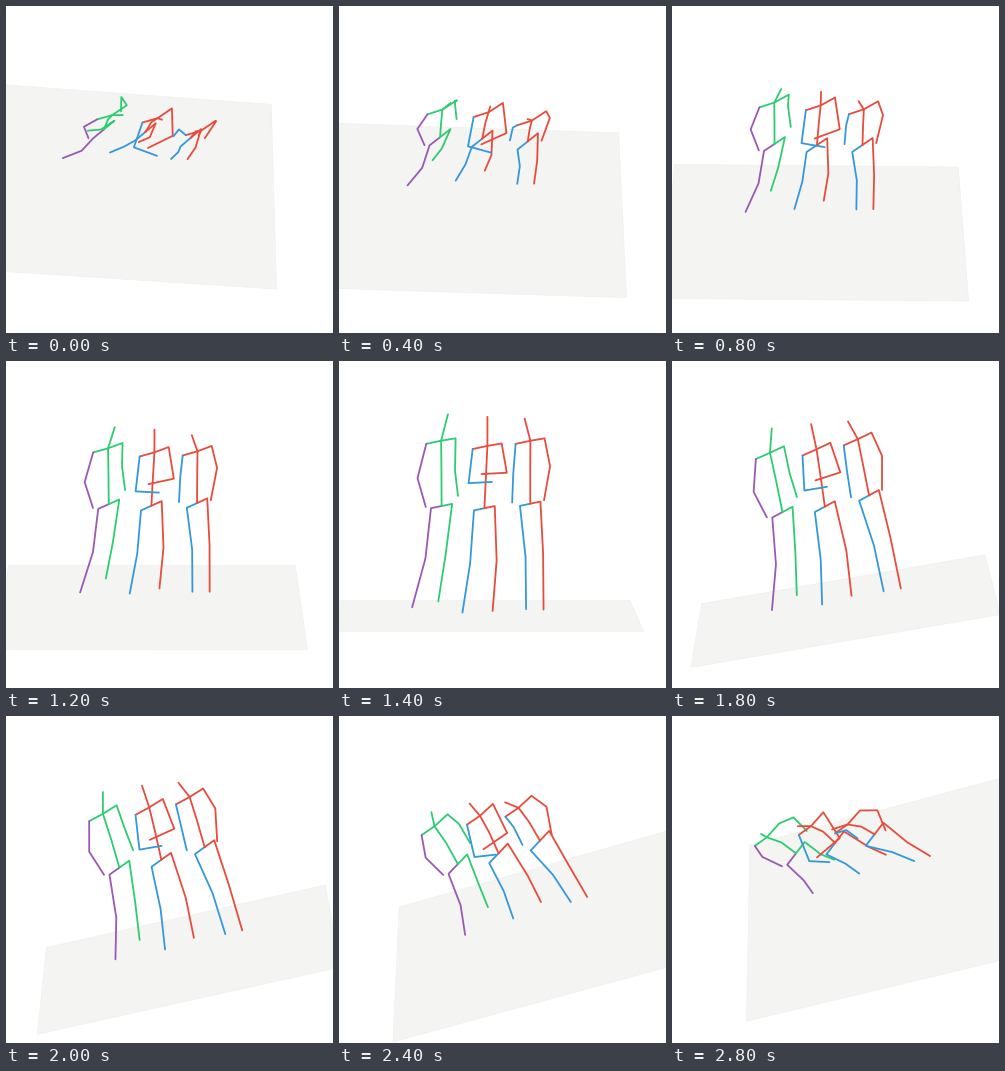
A matplotlib script for the animation above (3 s loop, 327 px wide and 327 px high).

```python
import numpy as np
import matplotlib.pyplot as plt
from matplotlib.animation import FuncAnimation

SIZE, DPI = 327, 100
FRAMES, STEP = 15, 200
TURN = 7                   # frame where the camera is lowest
CENTRE = np.array([146, 105])
DISTANCE = 2450

GREEN, PURPLE, RED, BLUE = "#2ecc71", "#9b59b6", "#e74c3c", "#3498db"

# World axes: across, up, towards the viewer. Each body is a pelvis position
# and bone vectors; hips, shoulders and the spine bend follow shared rules.
HIP = np.array([10.4, 1.2, -10.3])
SHOULDER = np.array([14.4, 2.2, -8])
COLLAR_DROP = np.array([-0.2, -0.6, -3.5])
SPINE_BEND = np.array([0, 0, -3.5])

BODIES = [
    dict(colours=(GREEN, PURPLE), pelvis=(-43.4, -40, 2),
         torso=(0, 67, 22), head=(7, 27, 15),
         side_arm=[(-9, -35, -11), (8, -29, -4)],
         main_arm=[(-1, -35, -30), (3, -25, 2)],
         side_leg=[(-6, -52, -14), (-14, -52, -19)],
         main_leg=[(-7, -54, -20), (-8, -51, -27)]),
    dict(colours=(RED, BLUE), pelvis=(-0.6, -42.4, 0),
         torso=(3, 64, 20.6), head=(0, 30, 19),
         side_arm=[(-4, -33, 10), (23, 2, 9)],
         main_arm=[(5, -28, 15), (-25, 0, 16)],
         side_leg=[(-4, -56, -24), (-8, -53, -22)],
         main_leg=[(2, -57, -16), (-4, -55, -25)]),
    dict(colours=(RED, BLUE), pelvis=(45.2, -37.3, 6),
         torso=(-0.5, 65, 29), head=(-6, 23, 18.5),
         side_arm=[(-2, -31, -24), (-1, -30, -9)],
         main_arm=[(6, -29, -17), (-6, -34, 1)],
         side_leg=[(6, -54, -24), (1, -56, -23)],
         main_leg=[(3, -54, -9), (1, -59, -19)]),
]

FLOOR = np.array([(152 * a, -150, 3 + 111 * d)
                  for a, d in [(-1, -1), (1, -1), (1, 1), (-1, 1)]])


def limb(start, bones):
    return np.cumsum([start, *bones], axis=0)


def build(body):
    """Return (points, colour) for each coloured path of one body."""
    main, side = body["colours"]
    pelvis = np.array(body["pelvis"])
    neck = pelvis + body["torso"]
    spine = (pelvis + neck) / 2 + SPINE_BEND
    collar = neck + COLLAR_DROP
    side_arm = limb(collar - SHOULDER, body["side_arm"])
    main_arm = limb(collar + SHOULDER, body["main_arm"])
    side_leg = limb(pelvis - HIP, body["side_leg"])
    main_leg = limb(pelvis + HIP, body["main_leg"])
    return [
        (np.vstack([pelvis, side_leg]), side),
        (np.vstack([pelvis, main_leg]), main),
        (np.vstack([neck + body["head"], neck, spine, pelvis]), main),
        (np.vstack([side_arm[0], neck, main_arm]), main),
        (side_arm, side),
    ]


def camera(t):
    """Pitch and roll in radians: sink to the floor, then rise and lean."""
    u = abs(t - TURN) / TURN
    if t < TURN:
        pitch, roll = 4.5 + 55.1 * u ** 0.67, -8.2 * u ** 3
    else:
        pitch, roll = 4.5 + 50.5 * u ** 1.43, 25 * u ** 0.72
    return np.radians(pitch), np.radians(roll)


def project(points, t):
    pitch, roll = camera(t)
    across, up, near = points.T
    x = across * np.cos(roll) - up * np.sin(roll)
    lift = across * np.sin(roll) + up * np.cos(roll)
    y = near * np.sin(pitch) - lift * np.cos(pitch)
    depth = lift * np.sin(pitch) + near * np.cos(pitch)
    scale = DISTANCE / (DISTANCE - depth)
    return CENTRE + np.column_stack([x * scale, y * scale])


fig = plt.figure(figsize=(SIZE / DPI, SIZE / DPI), dpi=DPI, facecolor="white")
ax = fig.add_axes([0, 0, 1, 1])
ax.set_xlim(0, SIZE)
ax.set_ylim(SIZE, 0)
ax.axis("off")

floor = plt.Polygon(project(FLOOR, 0), closed=True, facecolor="#f4f4f2",
                    edgecolor="#f0f0ee", linewidth=0.5)
ax.add_patch(floor)

paths = []
for body in BODIES:
    for points, colour in build(body):
        line, = ax.plot([], [], color=colour, lw=1.3,
                        solid_capstyle="round", solid_joinstyle="round")
        paths.append((line, points))


def draw(t):
    floor.set_xy(project(FLOOR, t))
    for line, points in paths:
        line.set_data(*project(points, t).T)
    return [floor] + [line for line, _ in paths]


anim = FuncAnimation(fig, draw, frames=FRAMES, interval=STEP,
                     init_func=lambda: draw(0), repeat=True, repeat_delay=0)
plt.show()
```
